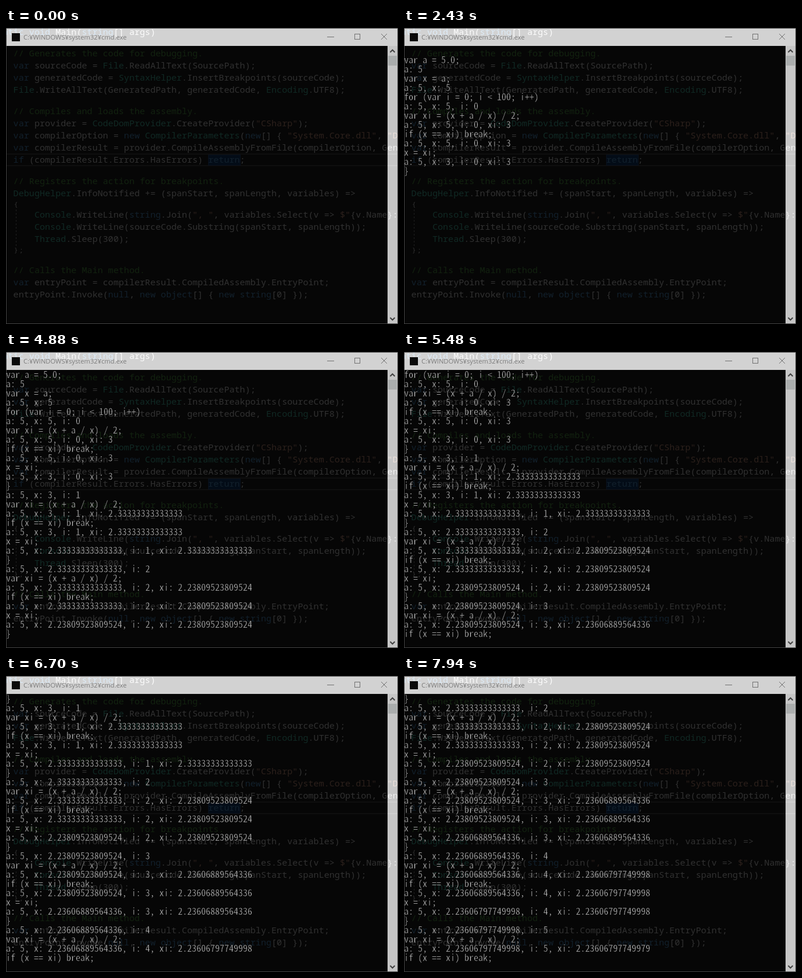
Animation of 675x512 px, one loop 8 s. Source, as an HTML page with a canvas:

```html
<!DOCTYPE html>
<html lang="en">
<head>
<meta charset="utf-8">
<title>Console debugging</title>
<style>
  html, body { margin: 0; width: 100%; height: 100%; overflow: hidden; background: #060606; }
  canvas { display: block; }
</style>
</head>
<body>
<canvas id="stage" width="675" height="512"></canvas>
<script>
const W = 675, H = 512, LOOP = 8000;
const stage = document.getElementById('stage');
const ctx = stage.getContext('2d');

// Puts each character in the middle of its own cell.
function grid(c, text, x, y, step, thin = false) {
  c.textAlign = 'center';
  [...text].forEach((ch, i) => {
    if (ch === ' ') return;
    const cx = x + (i + 0.5) * step;
    c.fillText(ch, cx, y);
    if (thin) c.strokeText(ch, cx, y);
  });
}

function path(c, points) {
  c.beginPath();
  points.forEach(([x, y]) => c.lineTo(x, y));
  c.stroke();
}

// ---- Code editor behind the window ----
const CELL = 9.07, LEFT = 12.6;
const code = [
  [12, '    static void Main(string[] args)', -8],
  [49, '// Generates the code for debugging.'],
  [70, 'var sourceCode = File.ReadAllText(SourcePath);'],
  [91, 'var generatedCode = SyntaxHelper.InsertBreakpoints(sourceCode);'],
  [112, 'File.WriteAllText(GeneratedPath, generatedCode, Encoding.UTF8);'],
  [149, '// Compiles and loads the assembly.'],
  [170, 'var provider = CodeDomProvider.CreateProvider("CSharp");'],
  [191, 'var compilerOption = new CompilerParameters(new[] { "System.Core.dll", "D'],
  [212, 'var compilerResult = provider.CompileAssemblyFromFile(compilerOption, Gene'],
  [233, 'if (compilerResult.Errors.HasErrors) return;'],
  [270, '// Registers the action for breakpoints.'],
  [291, 'DebugHelper.InfoNotified += (spanStart, spanLength, variables) =>'],
  [309, '{'],
  [328, '    Console.WriteLine(string.Join(", ", variables.Select(v => $"{v.Name}:'],
  [349, '    Console.WriteLine(sourceCode.Substring(spanStart, spanLength));'],
  [370, '    Thread.Sleep(300);'],
  [388, '};'],
  [424, '// Calls the Main method.'],
  [445, 'var entryPoint = compilerResult.CompiledAssembly.EntryPoint;'],
  [466, 'entryPoint.Invoke(null, new object[] { new string[0] });']
];
const styles = [
  ['#57a64a', /\/\/.*/g],
  ['#d69d85', /\$"|"[^"{]*"?/g],
  ['#569cd6', /\b(var|new|if|return|null|object|string|static|void)\b/g],
  ['#4ec9b0', /\b(File|SyntaxHelper|Encoding|CodeDomProvider|CompilerParameters|DebugHelper|Console|Thread)\b/g]
];

function drawCodeLine(c, y, text, indent = 0) {
  const size = /^[{}]/.test(text) ? 11.5 : 15.12;
  c.font = `500 ${size}px "Noto Sans Mono", "DejaVu Sans Mono", monospace`;
  const x = LEFT + indent * CELL;
  let plain = text;
  for (const [color, pattern] of styles) {
    c.fillStyle = color;
    for (const m of plain.matchAll(pattern)) {
      grid(c, m[0], x + m.index * CELL, y, CELL);
    }
    plain = plain.replace(pattern, s => ' '.repeat(s.length));
  }
  c.fillStyle = '#f0f0f0';
  grid(c, plain, x, y, CELL);
}

function drawEditor(c) {
  c.fillStyle = '#1e1e1e';
  c.fillRect(0, 0, W, H);
  c.lineWidth = 2;
  c.strokeStyle = '#464646';
  path(c, [[0, 218], [W, 218]]);
  path(c, [[0, 238], [W, 238]]);
  c.lineWidth = 1;
  c.fillStyle = '#0e3d74';
  c.fillRect(348, 219, 56, 19);
  c.strokeStyle = '#2c5288';
  c.strokeRect(348.5, 219.5, 55, 18);
  c.strokeStyle = '#a0a0a0';
  c.setLineDash([3, 3]);
  path(c, [[17.5, 314], [17.5, 378]]);
  c.setLineDash([]);
  code.forEach(([y, text, indent]) => drawCodeLine(c, y, text, indent));
}

// ---- Translucent console window ----
function drawWindow(c) {
  c.globalAlpha = 0.8;
  c.fillStyle = '#000';
  c.fillRect(0, 31, 657, 481);
  c.fillStyle = '#fff';
  c.fillRect(0, 0, W, 31);
  c.fillStyle = '#f0f0f0';
  c.fillRect(657, 31, 18, 481);
  c.globalAlpha = 1;

  c.fillStyle = '#aaadad';
  c.fillRect(658, 48, 15, 17);
  c.strokeStyle = '#404040';
  c.lineWidth = 2;
  path(c, [[661.5, 42], [665.5, 38], [669.5, 42]]);
  path(c, [[661.5, 501], [665.5, 505], [669.5, 501]]);

  c.fillStyle = '#0a0a0a';
  c.fillRect(10, 9, 14, 14);
  c.fillStyle = '#7c7c7c';
  c.textAlign = 'left';
  c.font = '11.2px "Open Sans", "Noto Sans", sans-serif';
  c.fillText('C:¥WINDOWS¥system32¥cmd.exe', 30, 20);

  c.strokeStyle = '#707070';
  c.lineWidth = 1;
  path(c, [[553, 15.5], [565, 15.5]]);
  c.strokeRect(600.5, 10.5, 9, 9);
  path(c, [[646, 10], [656, 20]]);
  path(c, [[656, 10], [646, 20]]);

  c.strokeStyle = '#444';
  c.strokeRect(0.5, 0.5, W - 1, H - 1);
}

const backdrop = document.createElement('canvas');
backdrop.width = W;
backdrop.height = H;
const back = backdrop.getContext('2d');
drawEditor(back);
drawWindow(back);

// ---- Console output: two lines per breakpoint ----
const log = ['', 'var a = 5.0;', 'a: 5', 'var x = a;', 'a: 5, x: 5', 'for (var i = 0; i < 100; i++)'];
const num = v => +v.toPrecision(15);
for (let i = 0, x = 5; i < 6; i++) {
  const xi = (x + 5 / x) / 2;
  const vars = v => `a: 5, x: ${num(v)}, i: ${i}`;
  const all = v => `${vars(v)}, xi: ${num(xi)}`;
  log.push(vars(x), 'var xi = (x + a / x) / 2;',
    all(x), 'if (x == xi) break;',
    all(x), 'x = xi;',
    all(xi), '}');
  x = xi;
}

const times = [
  590, 900, 1200, 1510, 1820, 2120, 2430, 2730, 3030, 3340, 3640, 3950, 4270,
  4580, 4880, 5190, 5480, 5790, 6100, 6410, 6700, 7010, 7320, 7630, 7940
];
const ROW = 16, ROWS = 29;
let shown = -1;

function draw(now) {
  const t = now % LOOP;
  const count = 2 * times.filter(s => s <= t).length;
  if (count !== shown) {
    shown = count;
    ctx.drawImage(backdrop, 0, 0);
    ctx.fillStyle = '#c4c4c4';
    // A dark outline slims the letters to hairlines.
    ctx.strokeStyle = '#060606';
    ctx.lineWidth = 0.4;
    ctx.font = '16px "Noto Sans Mono CJK JP", "Noto Sans CJK JP", "Liberation Mono", monospace';
    log.slice(Math.max(0, count - ROWS), count)
      .forEach((text, r) => grid(ctx, text, 0, 45 + r * ROW, 8, true));
  }
  requestAnimationFrame(draw);
}
draw(performance.now());
</script>
</body>
</html>
```
